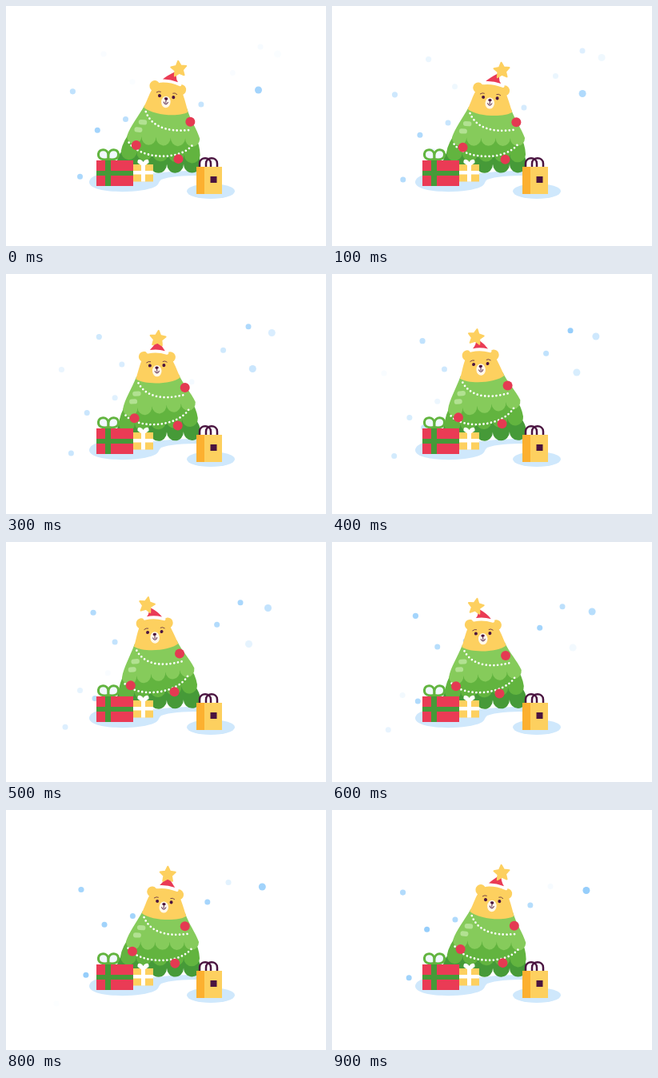
These frames come from a looping animation (400 by 300 pixels, 1000 ms). An HTML page:

```html
<!DOCTYPE html>
<html lang="en">
<head>
<meta charset="utf-8">
<title>Festive bear tree</title>
<style>
  html, body { margin: 0; width: 100%; height: 100%; overflow: hidden; background: #fff; }
  svg { display: block; width: 100vw; height: 100vh; }
  .light { fill: #86cb5b; }
  .mid { fill: #62b43f; }
  .dark { fill: #469a38; }
  .yellow { fill: #fdd05f; }
  .orange { fill: #fcb030; }
  .red { fill: #ea3b55; }
  .ball { fill: #e43a52; }
  .ink { fill: #4a1440; }
  .ice { fill: #cfe8fc; }
  .white { fill: #fff; }
  .line { fill: none; stroke: #4a1440; stroke-linecap: round; }
  .beads { fill: none; stroke: #fff; stroke-width: 2.7; stroke-linecap: round; stroke-dasharray: 0 4.8; }
</style>
</head>
<body>
<svg viewBox="0 0 400 300">
  <g id="snow" fill="#96cefb"></g>

  <g class="ice">
    <path d="M104 220C105 211 122 208 145 208L190 209C208 206 225 206 241 206V212C222 212 204 213 194 217C190 220 192 223 186 226C168 235 104 235 104 220Z"/>
    <ellipse cx="256" cy="231.5" rx="30" ry="9.5"/>
  </g>

  <path id="low" class="dark"/>
  <g id="upper">
    <path id="middle" class="mid"/>
    <path id="top" class="light"/>
    <g fill="#b2e192">
      <rect x="161" y="146" width="10.5" height="6" rx="3"/>
      <rect x="156.5" y="155.5" width="10" height="6" rx="3"/>
    </g>
    <path class="beads" d="M169 136C176 151 194 160 228 153"/>
    <path class="beads" d="M151 175C166 193 214 193 230 172"/>
    <g class="yellow">
      <circle cx="177.5" cy="104" r="6.5"/>
      <circle cx="210.5" cy="106" r="6.5"/>
      <path d="M166 131C170 121 172 112 176 106C181 95 206 95 211 106C215 114 218 122 221.5 132C211 139.5 178 139.5 166 131Z"/>
    </g>
    <ellipse cx="193" cy="122.3" rx="5.8" ry="7" fill="#fff8ea"/>
    <g class="ink">
      <circle cx="184.5" cy="115.3" r="2"/>
      <circle cx="202" cy="115.8" r="2"/>
      <ellipse cx="193" cy="118.4" rx="2.2" ry="1.6"/>
    </g>
    <path class="line" stroke-width=".9" d="M193 119V123.5M190.4 122.5Q190.8 125 193 125Q195.2 125 195.6 122.5"/>
    <path class="line" stroke-width=".7" d="M180.5 111.5Q183 109.5 185.5 110.5M201 111Q203.5 109.8 206 112"/>
  </g>

  <g id="balls" class="ball"></g>
  <path id="trim" fill="none" stroke="#fff" stroke-width="4" stroke-linecap="round"/>
  <path id="hat" class="red"/>
  <path id="star" class="yellow" stroke="#fdd05f" stroke-width="2" stroke-linejoin="round"/>

  <g fill="#f1f8fd" stroke="#62b43f" stroke-width="3">
    <path d="M128 191.5C119 193 115 190 115.5 185C116 178 127 177.5 128 186Z"/>
    <path d="M128 191.5C137 193 141 190 140.5 185C140 178 129 177.5 128 186Z"/>
  </g>
  <rect class="red" x="113" y="193" width="46" height="32"/>
  <path class="dark" d="M124 193h7v32h-7zM113 206h46v6h-46z"/>

  <rect class="yellow" x="159" y="198" width="25" height="21.5"/>
  <path class="white" d="M169 198h5v21.5h-5zM159 206h25v4.5h-25z"/>
  <path class="white" d="M171.5 201L164.5 196Q164 191 168 192Q171 193 171.5 195Q172 193 175 192Q179 191 178.5 196Z"/>

  <path class="line" stroke-width="2.5" d="M242 202V197C242 188 256 188 256 197V202M250 202V197C250 188 264 188 264 197V202"/>
  <rect class="yellow" x="238" y="201" width="32" height="34"/>
  <rect class="orange" x="238" y="201" width="10" height="34"/>
  <rect class="ink" x="255.5" y="213" width="8" height="8"/>
</svg>
<script>
const $ = id => document.getElementById(id);
const TAU = Math.PI * 2;
const STEPS = 10;

function addCircle(parent, r) {
  const c = document.createElementNS('http://www.w3.org/2000/svg', 'circle');
  c.setAttribute('r', r);
  return parent.appendChild(c);
}

function place(c, x, y) {
  c.setAttribute('cx', x);
  c.setAttribute('cy', y);
}

// Five scallops running from right to left
const scallops = (w, depth, dy) => `a${w / 2} ${depth} 0 0 1 ${-w} ${dy}`.repeat(5);
$('low').setAttribute('d', `M236 180Q243 189 243 197${scallops(21, 11, .3)}Q139 188 146 180Z`);
$('middle').setAttribute('d', `M232 158Q240 171 241 183${scallops(19.8, 10, .6)}Q143 174 154 158Z`);
$('top').setAttribute('d', `M220 128C225 141 234 151 239 163${scallops(18.2, 10, .8)}C151 155 160 143 167 128Z`);

let points = '';
for (let i = 0; i < 10; i++) {
  const r = i % 2 ? 5 : 10;
  const a = i * TAU / 10;
  points += `${i ? 'L' : 'M'}${r * Math.sin(a)} ${-r * Math.cos(a)}`;
}
$('star').setAttribute('d', points + 'Z');

// x, y, speed x, speed y, radius, peak step, last step, curved
const flakes = [
  [339.5, 60, -2.4, 4.5, 4.5, 9, 17],
  [318, 51, -5, 4.95, 3.5, 4, 9.5],
  [283.4, 83.5, -3.95, 3.95, 3.5, 7, 13.7],
  [122, 60, -4.07, 4.57, 3.6, 7, 14.5, 1],
  [157.9, 94.8, -4.36, 6.05, 3.5, 9, 17],
  [194, 97, -4.45, 4.45, 3.5, 7, 15.5],
  [129.5, 177.5, -3.7, 3.58, 3.5, 8, 18.3]
].map(f => ({ f, dots: [0, 1].map(() => addCircle($('snow'), f[4])) }));

function drawSnow(step) {
  for (const { f: [x, y, vx, vy, , peak, end, curved], dots } of flakes) {
    dots.forEach((dot, i) => {
      const k = step + i * STEPS;
      const u = k / 14;
      const bow = curved ? 4 * u * (1 - u) : 0;
      const wave = curved ? Math.sin(TAU * u) : 0;
      const fade = Math.min((k + .4) / (peak + .4), (end - k) / (end - peak));
      place(dot, x + vx * k + 5.8 * bow + 2.7 * wave, y + vy * k + 4 * bow + 2.2 * wave);
      dot.setAttribute('opacity', Math.max(0, fade));
    });
  }
}

// x, x swing, lag in steps, y, y swing, y bounce
const balls = [
  [223.7, 7, .5, 143.2, 2.8, 1.3],
  [159.3, 4.3, 1, 178, -2.8, 1.6],
  [213, 3.6, 1.3, 190.2, 2, 1.2]
].map(b => ({ b, dot: addCircle($('balls'), 6) }));

function drawTree(step) {
  const wave = lag => Math.cos(TAU * (step - lag) / STEPS);
  const sway = wave(-.5);
  const bob = 2 * sway * sway - 1;
  const tilt = 5 * sway;
  const lean = (angle, grow) =>
    `translate(190 205) scale(1 ${1 + grow * sway * sway}) rotate(${angle}) translate(-190 -205)`;
  $('low').setAttribute('transform', lean(tilt * .1, .01));
  $('upper').setAttribute('transform', lean(tilt, .038));

  for (const { b: [x, ax, lag, y, ay, bounce], dot } of balls)
    place(dot, x + ax * wave(lag), y + ay * sway - bounce * bob);

  const starX = 196 + 20 * wave(0);
  const starY = 80.2 - 1.7 * bob;
  $('star').setAttribute('transform', `translate(${starX} ${starY}) rotate(${3 - 8 * wave(0)})`);

  // The hat stretches from its brim towards the star
  const hatX = 195.5 + 10.5 * sway;
  const hatY = 95 - 2 * bob;
  const slope = Math.tan((tilt + 6) * Math.PI / 180);
  const at = (dx, dy) => `${hatX + dx} ${hatY + dx * slope + dy}`;
  const tipX = starX + .25 * (hatX - starX);
  const tipY = starY + 3;
  $('hat').setAttribute('d',
    `M${at(-9.5, 0)}Q${at(-5, -5)} ${tipX - 1} ${tipY}H${tipX + 1.5}Q${at(5, -6)} ${at(9.5, 0)}Q${at(0, -2)} ${at(-9.5, 0)}Z`);
  $('trim').setAttribute('d', `M${at(-12, 2.5)}Q${at(0, -.5)} ${at(12, 2.5)}`);
}

function frame() {
  const step = Math.floor(performance.now() % 1000 / 100);
  drawSnow(step);
  drawTree(step);
  requestAnimationFrame(frame);
}
frame();
</script>
</body>
</html>
```
